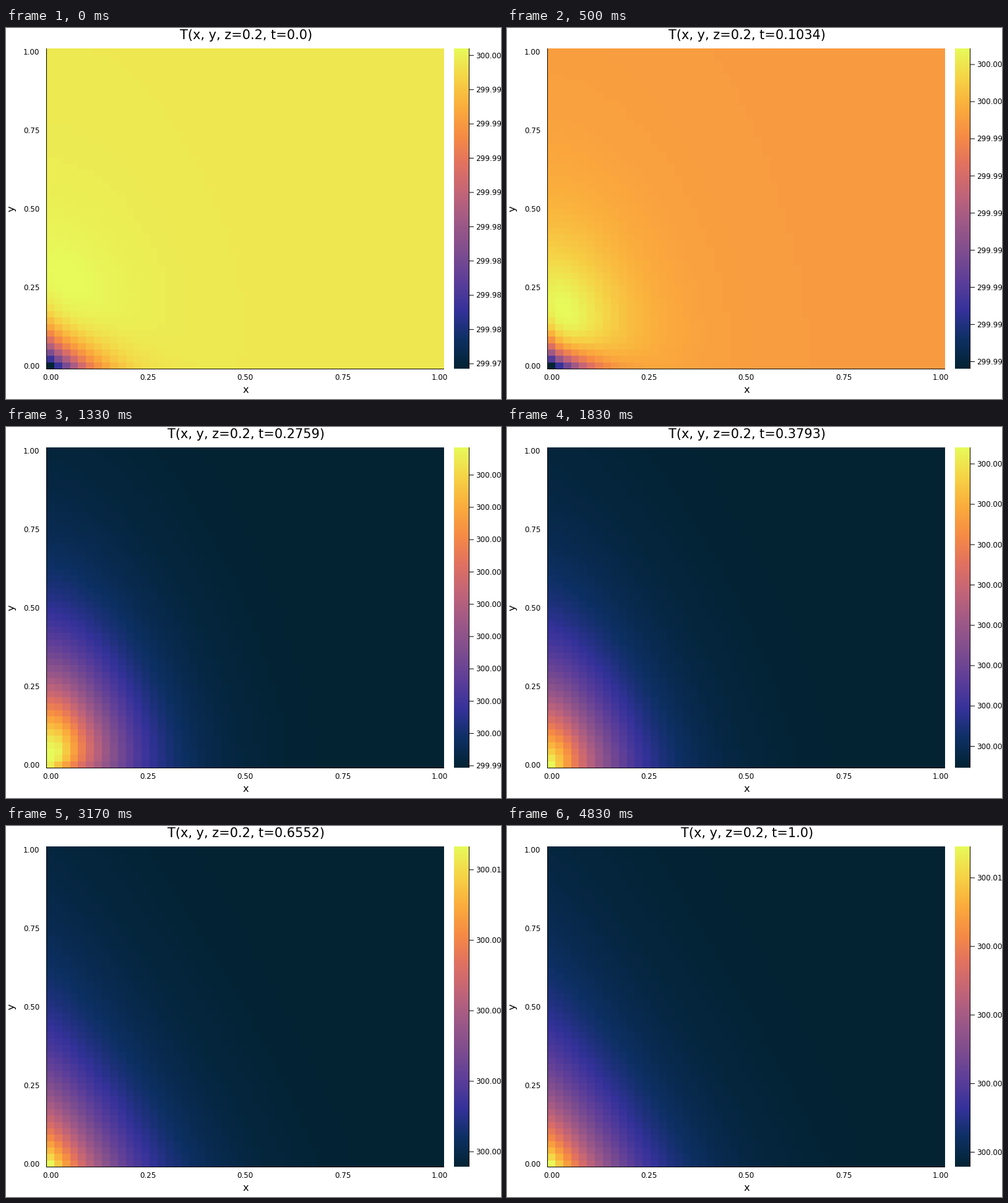
These frames come from a looping animation (800x600 px, 4990 ms). A matplotlib script:

```python
import numpy as np
import matplotlib.pyplot as plt
from matplotlib.animation import FuncAnimation
from matplotlib.colors import LinearSegmentedColormap

W, H, DPI = 800, 600, 100
STATES, HOLD, LOOP = 30, 5, 4990  # each state is held for HOLD ticks
TICKS = STATES * HOLD
N = 50
LEFT, RIGHT, TOP, BOTTOM = 65, 708, 33, 551
BAR_L, BAR_R = 724, 748
BASE = -0.53  # far-field level: thousandths above 300
MAX_MARKS = 14

plt.rcParams["font.family"] = "DejaVu Sans"

thermal = LinearSegmentedColormap.from_list("thermal", [
    "#032333", "#0d3064", "#35329b", "#5d3e99", "#7e4d8f", "#9e5987",
    "#c16479", "#e17161", "#f68b45", "#fbad3c", "#f6d346", "#e7fa5a"])

# Strength of the warm lobe over time
KNOT_T = np.array([0, 3, 5, 8, 15, 24, 29]) / 29
KNOT_P = np.array([7, 7.9, 8.15, 8.8, 10.78, 11.9, 11.68])
KNOT_D = np.gradient(KNOT_P, KNOT_T)


def warm_strength(t):
    """Cubic Hermite curve through the knots."""
    i = min(np.searchsorted(KNOT_T, t, side="right") - 1, len(KNOT_T) - 2)
    h = KNOT_T[i + 1] - KNOT_T[i]
    s = (t - KNOT_T[i]) / h
    return ((1 + 2 * s) * (1 - s) ** 2 * KNOT_P[i]
            + s * (1 - s) ** 2 * h * KNOT_D[i]
            + s * s * (3 - 2 * s) * KNOT_P[i + 1]
            + s * s * (s - 1) * h * KNOT_D[i + 1])


def cold_strength(t):
    return 29.33 * np.exp(-(6.5 + 2.6 * t) * t)


X, Y = np.meshgrid(np.linspace(0, 1, N), np.linspace(0, 1, N))


def field(t):
    """Temperature minus 300, in thousandths."""
    early = np.exp(-(t / 0.37) ** 2)
    # Contours start out bowed and straighten with time
    bow = 1.15 + 0.7 * early
    dx = (6.2 + 3.6 * early) * X + X ** 2
    dy = (4.1 + 1.5 * early) * Y - 0.5 * Y ** 2
    warm = np.exp(-(dx ** bow + dy ** bow) ** (1 / bow))
    cold = np.exp(-(10.5 + 6 * t) * X - (X / 0.3) ** 2
                  - (9.5 + 15 * t) * Y - (Y / 0.25) ** 2)
    return BASE + warm_strength(t) * warm - cold_strength(t) * cold


def mark_step(span):
    decade = 10 ** np.floor(np.log10(span))
    m = span / decade
    return decade * (0.25 if m < 2.5 else 0.5 if m < 5 else 1)


def label(x, y, text, px, **kw):
    kw = {"ha": "center", "va": "baseline", **kw}
    return ax.text(x, y, text, fontsize=px * 72 / DPI, color="black", **kw)


def stroke(xs, ys):
    return ax.plot(xs, ys, color="black", lw=0.72, zorder=3, snap=False,
                   solid_capstyle="butt")[0]


def picture(data, left, right):
    return ax.imshow(data, cmap=thermal, vmin=0, vmax=1, origin="lower",
                     interpolation="nearest", aspect="auto",
                     extent=(left, right, BOTTOM, TOP))


fig = plt.figure(figsize=(W / DPI, H / DPI), dpi=DPI, facecolor="white")
ax = fig.add_axes([0, 0, 1, 1])
ax.axis("off")

heat = picture(np.zeros((N, N)), LEFT, RIGHT)
picture(np.linspace(0, 1, 256)[:, None], BAR_L, BAR_R)
ax.set_xlim(0, W)
ax.set_ylim(H, 0)

stroke([65.5, 65.5], [TOP, 552])
stroke([LEFT, RIGHT], [551.5, 551.5])
stroke([748.5, 748.5], [TOP, BOTTOM])

for v in np.linspace(0, 1, 5):
    label(72 + 629.3 * v, 568.8, f"{v:.2f}", 11.9)
    label(54.3, 550.6 - 508 * v, f"{v:.2f}", 11.9, ha="right")
label(387, 590.5, "x", 16.4)
label(13.5, 292, "y", 16.4, rotation=90, rotation_mode="anchor")

title = label(388, 18.5, "", 20.83)
marks = [stroke([748, 756], [0, 0]) for _ in range(MAX_MARKS)]
values = [label(759, 0, "", 11.9, ha="left") for _ in range(MAX_MARKS)]


def draw(tick):
    k = min((tick + 1) // HOLD, STATES - 1)
    t = k / (STATES - 1)
    temp = field(t)
    lo, hi = temp.min(), temp.max()
    heat.set_data((temp - lo) / (hi - lo))
    title.set_text(f"T(x, y, z=0.2, t={round(t, 4)})")

    step = mark_step(hi - lo)
    first = int(np.ceil(lo / step))
    for i, (mark, value) in enumerate(zip(marks, values)):
        v = (first + i) * step
        shown = v <= hi
        mark.set_visible(shown)
        value.set_visible(shown)
        if shown:
            y = BOTTOM - (v - lo) / (hi - lo) * (BOTTOM - TOP)
            mark.set_ydata([y, y])
            value.set_y(y + 4.3)
            value.set_text(f"{300 + v / 1000:.4f}")
    return [heat, title, *marks, *values]


anim = FuncAnimation(fig, draw, frames=TICKS, interval=LOOP / TICKS,
                     init_func=lambda: draw(0), repeat=True, repeat_delay=0,
                     blit=False)
plt.show()
```
